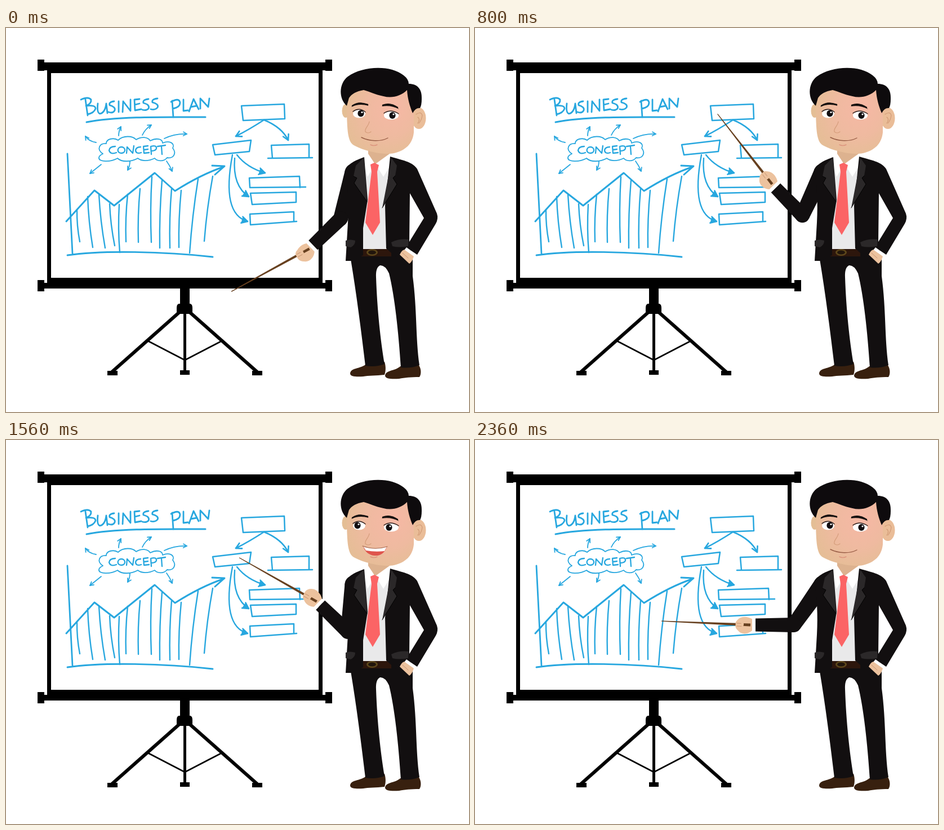
An HTML page with a canvas that plays this animation: 822 px wide and 681 px high, repeating every 2.4 s.

```html
<!DOCTYPE html>
<html lang="en">
<head>
<meta charset="utf-8">
<title>Business plan presentation</title>
<style>
html, body { margin: 0; width: 100%; height: 100%; overflow: hidden; background: #fff; }
canvas { display: block; }
</style>
</head>
<body>
<canvas id="stage" width="822" height="681"></canvas>
<script>
const ctx = document.getElementById('stage').getContext('2d');
const LOOP = 2400, STEP = 40;
const BLACK = '#000', SUIT = '#120f10', LAPEL = '#2b2829', BLUE = '#27a7df', WHITE = '#fff';
const SKIN = '#ecc29e', CREASE = '#c08a68', SHOE = '#38200f';

function fill(d, color) {
  ctx.fillStyle = color;
  ctx.fill(new Path2D(d));
}
function line(d, color, width) {
  ctx.strokeStyle = color;
  ctx.lineWidth = width;
  ctx.stroke(new Path2D(d));
}
function rect(x1, y1, x2, y2, color = BLACK) {
  ctx.fillStyle = color;
  ctx.fillRect(x1, y1, x2 - x1, y2 - y1);
}
function oval(x, y, rx, ry, color) {
  ctx.fillStyle = color;
  ctx.beginPath();
  ctx.ellipse(x, y, rx, ry, 0, 0, Math.PI * 2);
  ctx.fill();
}
// Curved arrow: start, control point, end.
function arrow(x1, y1, cx, cy, x2, y2, size, width, solid) {
  const a = Math.atan2(y2 - cy, x2 - cx);
  const wing = s => `${x2 - size * Math.cos(a + s)} ${y2 - size * Math.sin(a + s)}`;
  const head = `M${wing(0.5)}L${x2} ${y2}L${wing(-0.5)}`;
  line(`M${x1} ${y1}Q${cx} ${cy} ${x2} ${y2}`, BLUE, width);
  line(head, BLUE, width);
  if (solid) fill(head + 'Z', BLUE);
}

function drawBoard() {
  rect(68, 61, 568, 75);
  rect(73, 70, 562, 462);
  rect(68, 452, 568, 462);
  for (const x of [56, 567]) {
    rect(x, 56, x + 12, 76);
    rect(x, 447, x + 12, 467);
  }
  rect(80, 80, 555, 443, WHITE);

  rect(309, 462, 326, 492);
  fill('M307 489H327Q331 490 331 496V503Q331 506 327 507H307Q303 506 303 503V496Q303 490 307 489Z', BLACK);
  line('M309 503L188 610M325 503L446 610', BLACK, 6);
  line('M317.5 505V608', BLACK, 5);
  line('M252 555L317.5 589L383 555', BLACK, 2.6);
  rect(180, 608, 198, 616);
  rect(437, 608, 455, 616);
  rect(309, 607, 326, 615);
}

function drawLettering() {
  const title = [
    'M133 127Q146 121 151 127Q152 134 142 138Q159 136 159 143Q156 151 145 153M141 127L145 155',
    'M163 134Q161 151 167 152Q176 150 178 134L180 151',
    'M192 130Q182 131 184 137Q195 140 193 146Q190 152 182 149',
    'M200 130V149M207 149L208 130L221 147V127',
    'M237 126L228 127L229 146L240 144M229 136L237 134',
    'M253 126Q242 127 244 133Q256 136 253 143Q249 147 242 145',
    'M269 125Q258 126 260 132Q272 135 269 141Q265 146 257 144',
    'M295 129L297 158M293 131Q307 123 309 132Q309 141 296 143',
    'M315 127V147L323 146M325 148L333 126L342 144M328 140L339 138',
    'M345 143V125L359 140L361 125'
  ];
  line(title.join(''), BLUE, 2.8);
  line('M143 167C200 156 290 158 354 158', BLUE, 3);

  const label = 'M194 210Q184 210 183 217Q185 225 196 221M205 211C212 211 214 221 205 222C196 222 197 211 205 211' +
    'M214 222L215 211L225 222L227 209M239 211Q231 211 230 217Q231 224 240 221' +
    'M252 209L244 210L245 222L254 221M245 216L252 215M258 224L257 210Q268 207 267 214Q265 218 258 218' +
    'M269 210L283 208M276 210L277 224';
  line(label, BLUE, 2.3);
  line('M172 223C160 215 166 204 178 205C178 196 192 194 199 199C208 190 225 191 231 198' +
    'C240 192 252 193 256 200C268 194 278 197 278 204C292 198 300 206 296 213' +
    'C303 222 298 232 286 230C280 238 268 236 264 231C252 237 240 236 234 231' +
    'C222 238 205 238 198 231C186 238 164 238 165 230C165 227 168 225 172 223', BLUE, 1.8);

  arrow(160, 203, 147, 201, 141, 192, 7, 1.8);
  arrow(200, 191, 200, 183, 204, 175, 7, 1.8);
  arrow(242, 190, 247, 179, 258, 172, 7, 1.8);
  arrow(281, 196, 300, 187, 321, 188, 7, 1.8);
  arrow(169, 242, 159, 250, 149, 258, 7, 1.8);
  arrow(220, 236, 220, 245, 216, 252, 7, 1.8);
  arrow(285, 236, 291, 244, 295, 254, 7, 1.8);
}

function drawChart() {
  line('M109 223L118 400M109 403C170 394 280 396 367 406', BLUE, 2.8);
  line('M107 343L157 288L192 315L264 257L300 289C330 270 360 255 387 246M366 244L388 245L371 260', BLUE, 3);
  const bars = [
    [126, 322, 131, 379], [145, 299, 154, 389], [165, 295, 176, 390], [184, 312, 193, 386],
    [201, 313, 202, 398], [216, 295, 213, 379], [238, 285, 235, 380], [259, 264, 258, 380],
    [277, 270, 273, 390], [294, 285, 291, 390], [311, 288, 307, 389], [341, 268, 326, 399],
    [367, 263, 352, 378]
  ];
  for (const [x1, y1, x2, y2] of bars) {
    line(`M${x1} ${y1}Q${(x1 + x2) / 2 - 3} ${(y1 + y2) / 2} ${x2} ${y2}`, BLUE, 2.4);
  }

  line('M418 138L494 135L495 161L421 164ZM367 207L435 199L432 219L371 225Z' +
    'M473 231L471 208L538 206V229M465 231L544 230' +
    'M433 283L432 266L521 263L522 283M433 283L532 282' +
    'M434 293L515 291V309L437 313ZM434 349L433 330L511 326V343M434 349L516 343', BLUE, 2.5);
  arrow(458, 163, 432, 180, 408, 192, 11, 2.6);
  arrow(458, 163, 490, 176, 501, 199, 11, 2.6);
  arrow(410, 225, 428, 248, 460, 257, 12, 2.4, true);
  arrow(406, 231, 402, 280, 431, 299, 12, 2.4, true);
  arrow(402, 225, 382, 330, 429, 343, 12, 2.4, true);
}

function limb(x1, y1, r1, x2, y2, r2) {
  const a = Math.atan2(y2 - y1, x2 - x1) + Math.PI / 2, c = Math.cos(a), s = Math.sin(a);
  oval(x1, y1, r1, r1, SUIT);
  fill(`M${x1 + r1 * c} ${y1 + r1 * s}L${x2 + r2 * c} ${y2 + r2 * s}` +
    `L${x2 - r2 * c} ${y2 - r2 * s}L${x1 - r1 * c} ${y1 - r1 * s}Z`, SUIT);
}

// time, elbow x, elbow y, forearm angle, pointer angle (degrees below the horizontal)
const POSES = [
  [0, 594, 338, 44, 28.7], [80, 594, 338, 44, 28.7], [320, 584, 337, 10, 3.4],
  [600, 579, 334, -14, -19], [640, 579, 334, -14, -19], [680, 576, 333, -27, -31.5],
  [840, 583, 332, -52, -59], [1080, 583, 332, -52, -59], [1120, 583, 334, -48, -52],
  [1560, 607, 340, -44, -29.5], [1640, 603, 341, -36, -24], [1920, 591, 339, -15, -16.5],
  [2000, 591, 339, -15, -16.5], [2160, 566, 330, -1, -4], [2320, 566, 330, -1, -4],
  [2360, 566, 328, 0, -2.5]
];

function poseAt(t) {
  const i = POSES.findIndex(p => p[0] > t);
  if (i < 0) return POSES[POSES.length - 1].slice(1);
  const a = POSES[i - 1], b = POSES[i], k = (t - a[0]) / (b[0] - a[0]);
  return a.map((v, n) => v + (b[n] - v) * k).slice(1);
}

function drawPointingArm(t) {
  const [ex, ey, fore, stick] = poseAt(t);
  const rad = d => d * Math.PI / 180;
  const wx = ex - 68 * Math.cos(rad(fore)), wy = ey + 68 * Math.sin(rad(fore));
  limb(617, 256, 15.5, ex, ey, 13);
  limb(ex, ey, 13, wx, wy, 11.5);

  ctx.save();
  ctx.translate(wx, wy);
  ctx.rotate(-rad(fore));
  fill('M-3 -8C-10 -15 -25 -17 -32 -9C-38 -3 -37 5 -31 10C-26 17 -13 18 -4 8Z', SKIN);
  fill('M0 -11L-6 -10V10L0 11Z', WHITE);
  ctx.translate(-9, 0);
  ctx.rotate(rad(fore - stick));
  fill('M0 -2.4L-158 -.6V.6L0 2.4Z', '#67401f');
  fill('M-15 -7Q-22 -10 -26 -4Q-28 4 -23 8Q-15 10 -13 4Q-10 -3 -15 -7Z', SKIN);
  line('M-24 -2H-17M-24 3H-16', CREASE, 0.8);
  ctx.restore();
}

function drawBody() {
  // Legs and shoes
  fill('M611 613C612 602 628 605 638 597L672 592C675 601 674 610 672 615C656 617 643 616 634 618C622 619 611 618 611 613Z', SHOE);
  fill('M673 617C674 606 690 609 700 600L733 598C738 606 737 615 734 619C718 619 708 620 698 622C684 623 674 622 673 617Z', SHOE);
  fill('M612 398H722V440C730 500 727 550 734 598Q718 604 701 602C697 540 690 475 680 435Q673 420 664 421Q656 425 657 442C659 500 665 555 672 596Q656 602 638 599C631 540 622 470 612 410Z', SUIT);

  // Shirt, collar and tie
  fill('M643 212H681V235L656 248L643 238Z', '#ddb28f');
  fill('M636 232L655 244L686 232L680 394H633Z', '#e9e9ea');
  rect(630, 392, 684, 405, '#2d160c');
  oval(650, 398, 10, 6, '#5d471b');
  oval(650, 398, 7, 3.5, '#21150c');
  fill('M641 220L633 235L642 264L655 241ZM681 223L656 241L670 264L688 235Z', WHITE);
  fill('M647 242L654 239L662 243L659 255L664 345L651 367L638 345L649 255Z', '#fb6465');

  // Jacket
  fill('M636 229C620 235 607 240 603 253C607 280 609 310 607 345L603 413H614L634 403V355L642 305Z', SUIT);
  fill('M682 228C710 236 722 238 730 250L765 329Q768 338 763 347L730 402L710 389L742 337L717 293L716 380L721 407L699 412L675 391L673 315Z', SUIT);
  fill('M635 230L621 244L617 263L623 266L618 275L641 308L637 250Z', LAPEL);
  fill('M684 230L694 244L691 262L687 266L694 277L668 319L681 252Z', LAPEL);
  line('M617 263L623 266L618 275L641 308M691 262L687 266L694 277L668 319', BLACK, 1);
  fill('M603 377Q611 374 620 377Q620 385 612 389L603 387Z', LAPEL);
  fill('M684 380Q699 373 715 375L714 387Q698 390 686 387Z', LAPEL);
  fill('M711 389L729 402L726 407L707 394Z', WHITE);
  fill('M707 393L724 405Q721 415 716 418L699 402Q702 395 707 393Z', SKIN);
  line('M704 399L714 408', CREASE, 0.8);
}

function skinTone() {
  const g = ctx.createRadialGradient(688, 138, 8, 675, 155, 82);
  g.addColorStop(0, '#f5b8a4');
  g.addColorStop(0.5, '#efbaa0');
  g.addColorStop(1, '#e4be95');
  return g;
}

function drawMouth(t) {
  const within = (a, b) => t >= a && t < b;
  const open = within(200, 560) || within(1280, 1640);
  const half = within(120, 760) || within(1200, 1720);
  if (open) {
    fill('M634 188Q655 196 676 189C673 201 663 206 654 205C644 204 637 198 634 188Z', '#df544d');
    fill('M634 188Q655 196 676 189L672 197Q655 199 639 196Z', WHITE);
    line('M633 188Q655 196 677 189', '#a3684e', 1.2);
  } else if (half) {
    fill('M634 193Q655 198 675 191C671 200 663 203 654 202C645 202 638 198 634 193Z', WHITE);
    line('M633 192Q655 198 676 190M636 195C643 203 663 204 673 194', '#a3684e', 1.1);
  } else {
    line('M631 194C645 201 665 202 678 195', '#995e47', 1.4);
  }
  line('M647 207Q653 210 659 207', '#dd957f', 1.4);
}

function drawHead(t) {
  const skin = skinTone();
  oval(603, 147, 6.5, 12, '#e4be95');
  oval(733, 160, 12.5, 19, '#eabd98');
  line('M728 153Q737 147 739 155Q738 163 733 169M731 158Q736 162 731 169', '#cf9874', 1.1);
  fill('M604 105H724V185C722 205 710 217 689 222C668 226 632 217 616 207C606 199 606 178 605 150Z', skin);

  fill('M605 138C591 126 590 99 607 86C633 67 683 65 706 84Q715 91 715 99C731 99 739 109 738 126Q738 137 735 142Q727 141 722 151C717 139 713 126 712 110C701 121 685 125 670 121C655 118 646 113 635 110Q616 113 609 124Z', '#0e0b0d');
  fill('M613 140Q625 126 644 138Q627 133 613 140ZM667 139Q681 128 698 144Q683 136 667 139Z', '#15100f');
  line('M615 138Q626 130 642 136M669 137Q682 132 695 141', '#15100f', 2.5);

  const shift = t >= 1240 && t < 1760 ? -6 : 0;
  oval(627, 152, 11, 7.5, WHITE);
  oval(684, 155, 13, 7.5, WHITE);
  line('M616 148Q627 140 638 149M671 151Q683 143 697 152', '#2a1b18', 1.4);
  for (const [x, y] of [[630, 151.5], [686, 155]]) {
    oval(x + shift, y, 5.6, 6, '#110d10');
    oval(x + shift + 2, y - 2, 1.6, 1.6, WHITE);
  }
  line('M645 166C644 174 636 178 638 184Q643 188 648 184', '#d49c7a', 1.2);
  drawMouth(t);
}

function render() {
  const t = Math.floor(performance.now() % LOOP / STEP) * STEP;
  rect(0, 0, 822, 681, WHITE);
  ctx.lineCap = 'butt';
  ctx.lineJoin = 'miter';
  drawBoard();
  ctx.lineCap = ctx.lineJoin = 'round';
  drawLettering();
  drawChart();
  drawPointingArm(t);
  drawBody();
  drawHead(t);
  requestAnimationFrame(render);
}
render();
</script>
</body>
</html>
```
